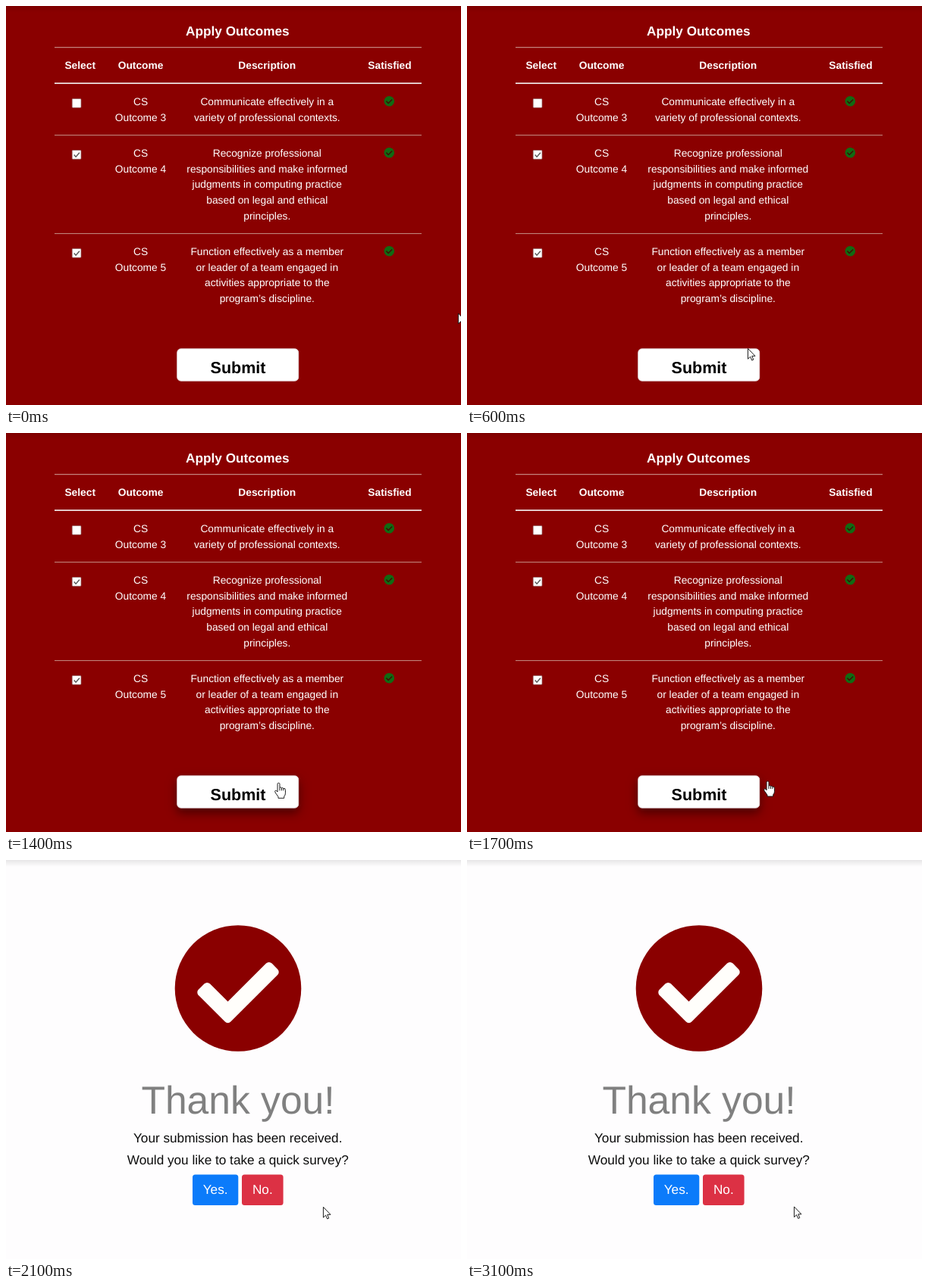
An HTML page for the animation above (3200 ms loop, 600 by 527 pixels).

```html
<!DOCTYPE html>
<html lang="en">
<head>
<meta charset="utf-8">
<title>Apply Outcomes</title>
<style>
  html, body { margin: 0; width: 100%; height: 100%; overflow: hidden; background: #8a0000; }
  svg { display: block; width: 600px; height: 527px; }
  text {
    font-family: "Liberation Sans", Arial, sans-serif;
    text-anchor: middle;
    text-rendering: geometricPrecision;
  }
</style>
</head>
<body>
<svg viewBox="0 0 600 527">
  <defs>
    <linearGradient id="topShade" x2="0" y2="1">
      <stop offset="0" stop-opacity=".09"/>
      <stop offset="1" stop-opacity="0"/>
    </linearGradient>
    <filter id="blurNear" x="-20%" y="-60%" width="140%" height="220%"><feGaussianBlur stdDeviation="6"/></filter>
    <filter id="blurFar" x="-20%" y="-60%" width="140%" height="220%"><feGaussianBlur stdDeviation="8"/></filter>
    <path id="tick" d="M216 376 400 192 377.4 169.4 216 330.7 134.6 249.4 112 272Z"
          stroke-width="32" stroke-linejoin="round"/>
  </defs>

  <g id="form">
    <rect width="600" height="527" fill="#8a0000"/>
    <g id="table"></g>
    <g id="shadow">
      <rect x="225.5" y="459.5" width="160.5" height="43" rx="5" fill-opacity=".28" filter="url(#blurNear)"/>
      <rect x="225.5" y="457.5" width="160.5" height="43" rx="5" fill-opacity=".24" filter="url(#blurFar)"/>
    </g>
    <rect x="225.7" y="452.8" width="160" height="42.4" rx="5" fill="#fff" stroke="#e6dfe2" stroke-width=".9"/>
  </g>

  <g id="thanks">
    <rect width="600" height="527" fill="#fefdfe"/>
  </g>

  <rect width="600" height="9" fill="url(#topShade)"/>

  <g id="cursor" fill="#fff" stroke="#111" stroke-width="1.1" stroke-linejoin="round">
    <path id="arrow" transform="scale(.86)" d="M.5 .5V16.5L4.2 13 6.6 18.6 9 17.6 6.7 12H11.6Z"/>
    <path id="hand" transform="scale(.86)" d="M-1.7 14V2Q-1.7 .3 0 .3T1.7 2V7.4Q3.2 6 4.6 8
      Q6.2 6.8 7.4 8.8Q10.4 7.8 10.4 11V16Q10.4 19 8.4 21V23.6H-.6V21.4L-5 15.2
      Q-6.4 12.8-4.8 11.8-3.4 11.2-1.7 14ZM1.7 7.4V12M4.6 8V12M7.4 8.8V12"/>
  </g>
</svg>

<script>
const NS = "http://www.w3.org/2000/svg";
const LOOP = 3200, STEP = 100, SENT = 1800;
const BODY = 13.77, LEADING = 20.65;
const $ = id => document.getElementById(id);
const form = $("form"), table = $("table"), thanks = $("thanks");

function add(parent, tag, attrs, content = "") {
  const node = document.createElementNS(NS, tag);
  for (const name in attrs) node.setAttribute(name, attrs[name]);
  node.textContent = content;
  parent.append(node);
  return node;
}

function label(parent, content, x, y, size, fill, weight = 400) {
  add(parent, "text", { x, y, fill, "font-size": size, "font-weight": weight }, content);
}

function lines(list, x, y) {
  list.forEach((line, i) => label(table, line, x, y + i * LEADING, BODY, "#fff"));
}

function rule(y, height, fill) {
  add(table, "rect", { x: 64, y, width: 484, height, fill });
}

function checkedCircle(parent, x, y, radius, fill, tickFill) {
  const g = add(parent, "g", {
    transform: `translate(${x} ${y}) scale(${radius / 248}) translate(-256 -256)`
  });
  add(g, "circle", { cx: 256, cy: 256, r: 248, fill });
  add(g, "use", { href: "#tick", fill: tickFill, stroke: tickFill });
}

function checkbox(y, checked) {
  add(table, "rect", { x: 87.2, y: y - 5.8, width: 11.8, height: 11.8, rx: 1, fill: "#fff", stroke: "#8d6060", "stroke-width": .7 });
  if (checked) add(table, "path", {
    d: `M89.7 ${y + .2}l2.4 2.6 4.8-5.4`, fill: "none", stroke: "#555", "stroke-width": 1.4
  });
}

function button(x, width, fill, content) {
  add(thanks, "rect", { x, y: 415.5, width, height: 40.5, rx: 3.5, fill });
  label(thanks, content, x + width / 2, 441.3, 17.2, "#fff");
}

function buildForm() {
  label(table, "Apply Outcomes", 305.4, 39, 17.2, "#fff", 700);
  [["Select", 97.7], ["Outcome", 177.6], ["Description", 344.2], ["Satisfied", 506]]
    .forEach(([name, x]) => label(table, name, x, 83, BODY, "#fff", 700));
  rule(54.2, 1, "#d0a39b");
  rule(101.2, 1.8, "#eadcdc");
  rule(170.1, 1, "#c58f86");
  rule(300.1, 1, "#c58f86");

  const rows = [
    [131, 3, false, ["Communicate effectively in a", "variety of professional contexts."]],
    [199, 4, true, ["Recognize professional", "responsibilities and make informed",
      "judgments in computing practice", "based on legal and ethical", "principles."]],
    [329, 5, true, ["Function effectively as a member", "or leader of a team engaged in",
      "activities appropriate to the", "program’s discipline."]]
  ];
  for (const [y, number, checked, description] of rows) {
    checkbox(y - 2.7, checked);
    lines(["CS", `Outcome ${number}`], 177.5, y);
    lines(description, 344.3, y);
    checkedCircle(table, 505.3, y - 5.2, 6.8, "#116b13", "#3c1206");
  }
  label(form, "Submit", 306, 485.2, 21.5, "#000", 700);
}

function buildThanks() {
  checkedCircle(thanks, 306, 169.5, 83.3, "#8a0000", "#fffefb");
  label(thanks, "Thank you!", 306, 335.4, 51.6, "#808080");
  label(thanks, "Your submission has been received.", 305.7, 373, 17.2, "#0c0c0c");
  label(thanks, "Would you like to take a quick survey?", 305.8, 402.2, 17.2, "#0c0c0c");
  button(246, 60.3, "#0b7bfa", "Yes.");
  button(311, 54.6, "#dc3144", "No.");
}

// Pointer hotspot as [time, x, y]
const route = [
  [0, 596, 405.5], [600, 370, 452], [1200, 359.5, 462], [1400, 359.5, 462],
  [1700, 396.5, 459.7], [1800, 405, 458.5], [2400, 431, 457.5], [LOOP, 431, 457.5]
];

function pointerAt(t) {
  const i = route.findIndex(key => key[0] > t);
  const [t0, x0, y0] = route[i - 1], [t1, x1, y1] = route[i];
  const k = (t - t0) / (t1 - t0);
  return [x0 + (x1 - x0) * k, y0 + (y1 - y0) * k];
}

function show(node, visible) {
  node.setAttribute("display", visible ? "inline" : "none");
}

function render(time) {
  const t = Math.floor(time % LOOP / STEP) * STEP;
  const hovering = t >= 700 && t < SENT;
  show(form, t < SENT);
  show(thanks, t >= SENT);
  show($("hand"), hovering);
  show($("arrow"), !hovering);
  $("shadow").setAttribute("opacity", hovering ? Math.min(1, (t - 600) / 500) : 0);
  $("cursor").setAttribute("transform", `translate(${pointerAt(t).join(" ")})`);
}

buildForm();
buildThanks();
const start = performance.now();
function tick() {
  render(Math.max(0, performance.now() - start));
  requestAnimationFrame(tick);
}
tick();
</script>
</body>
</html>
```
